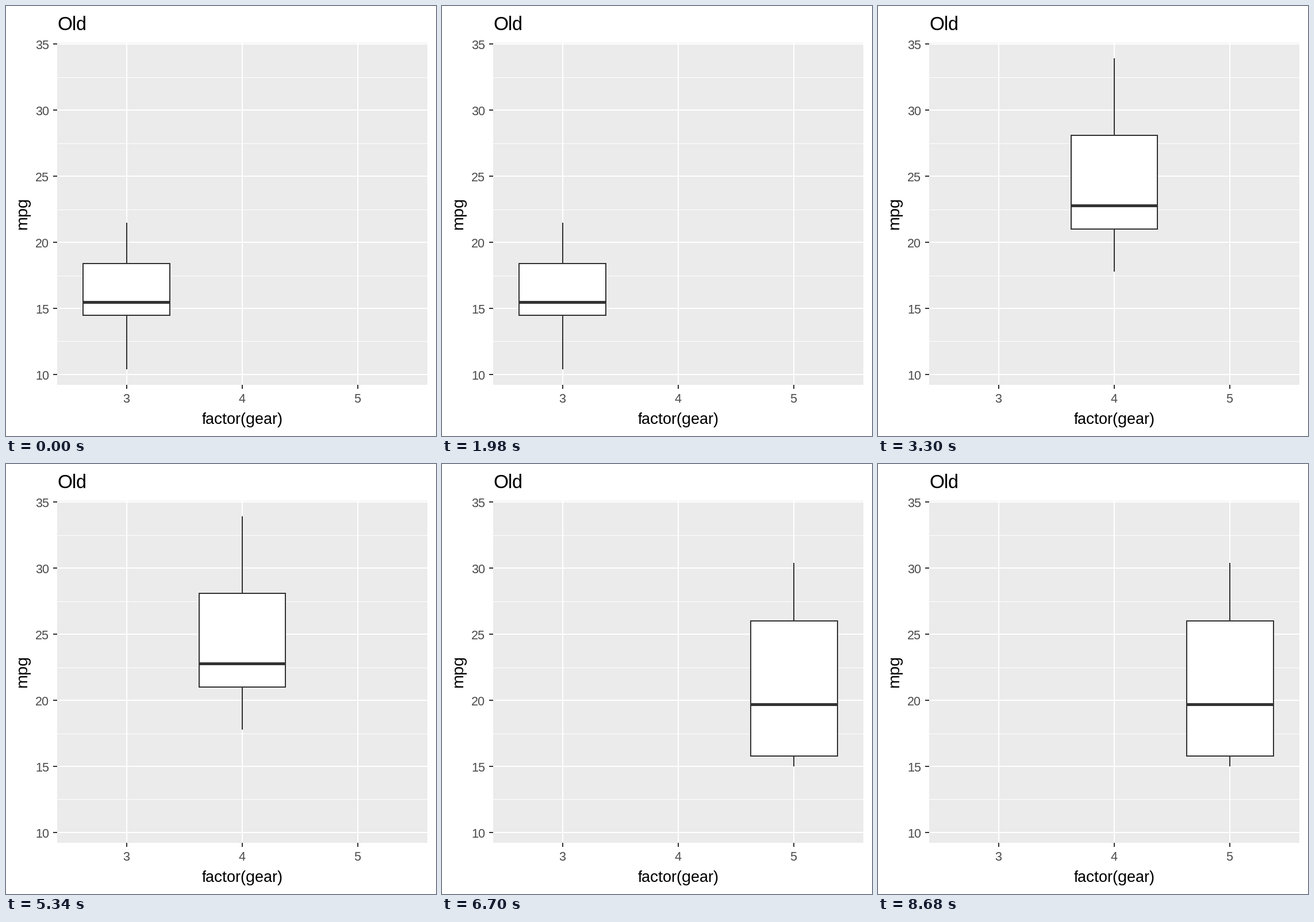
Write a matplotlib script that moves like this. It is 748 px wide and 748 px high and loops after 10000 ms.

```python
import matplotlib.pyplot as plt
from matplotlib.animation import FuncAnimation
from matplotlib.patches import Rectangle

SIZE, DPI = 748, 88
LEFT, RIGHT, TOP, BOTTOM = 89, 733, 64, 659
PANEL, INK, LABEL = "#EBEBEB", "#333333", "#4D4D4D"
BASE = 28  # axis title size in pixels

# gear: low whisker, lower quartile, median, upper quartile, high whisker
STATS = {
    3: (10.4, 14.5, 15.5, 18.4, 21.5),
    4: (17.8, 21, 22.8, 28.075, 33.9),
    5: (15, 15.8, 19.7, 26, 30.4),
}

plt.rcParams.update({
    "font.family": "Liberation Sans",
    "text.hinting": "native",
    "text.hinting_factor": 1,
})

fig = plt.figure(figsize=(SIZE / DPI, SIZE / DPI), dpi=DPI, facecolor="white")
ax = fig.add_axes([0, 0, 1, 1])
ax.set_xlim(0, SIZE)
ax.set_ylim(SIZE, 0)
ax.axis("off")


def x_at(gear):
    return round(209.75 + 201.25 * (gear - 3))


def y_at(mpg):
    return round(66.21 + 22.99 * (35 - mpg))


def rect(x0, y0, x1, y1, color, z=1):
    patch = Rectangle((x0, y0), x1 - x0, y1 - y0, facecolor=color,
                      linewidth=0, antialiased=False, zorder=z)
    return ax.add_patch(patch)


def text(x, y, s, px, color="black", ha="center", **kw):
    ax.text(x, y, s, fontsize=px * 72 / DPI, color=color,
            ha=ha, va="baseline", **kw)


def draw_axes():
    rect(LEFT, TOP, RIGHT, BOTTOM, PANEL)
    for i in range(5):
        y = y_at(12.5 + 5 * i)
        rect(LEFT, y, RIGHT, y + 1, "white", 2)
    for mpg in range(10, 36, 5):
        y = y_at(mpg)
        rect(LEFT, y - 1, RIGHT, y + 1, "white", 2)
        rect(LEFT - 7, y - 1, LEFT, y + 1, INK)
        text(75, y + 9, str(mpg), 0.8 * BASE, LABEL, ha="right")
    for gear in STATS:
        x = x_at(gear)
        rect(x - 1, TOP, x + 1, BOTTOM, "white", 2)
        rect(x - 1, BOTTOM, x + 1, BOTTOM + 7, INK)
        text(x - 0.5, 690, str(gear), 0.8 * BASE, LABEL)
    text(LEFT, 42, "Old", 1.2 * BASE, ha="left")
    text(411.5, 727, "factor(gear)", BASE)
    text(36, 360.5, "mpg", BASE, rotation=90, rotation_mode="anchor")


def draw_box(gear):
    low, q1, mid, q3, high = map(y_at, STATS[gear])
    x, left, right = (x_at(gear + d) for d in (0, -0.375, 0.375))
    return [
        rect(x - 1, high, x + 1, q3, INK, 3),
        rect(x - 1, q1, x + 1, low, INK, 3),
        rect(left - 1, q3 - 1, right + 1, q1 + 1, INK, 4),
        rect(left + 1, q3 + 1, right - 1, q1 - 1, "white", 5),
        rect(left, mid - 2, right, mid + 3, INK, 6),
    ]


draw_axes()
boxes = {gear: draw_box(gear) for gear in STATS}


def update(i):
    shown = 3 if i < 33 else 4 if i < 67 else 5
    for gear, parts in boxes.items():
        for part in parts:
            part.set_visible(gear == shown)
    return []


anim = FuncAnimation(fig, update, frames=100, interval=100,
                     init_func=lambda: update(0), repeat=True, repeat_delay=0)
plt.show()
```
